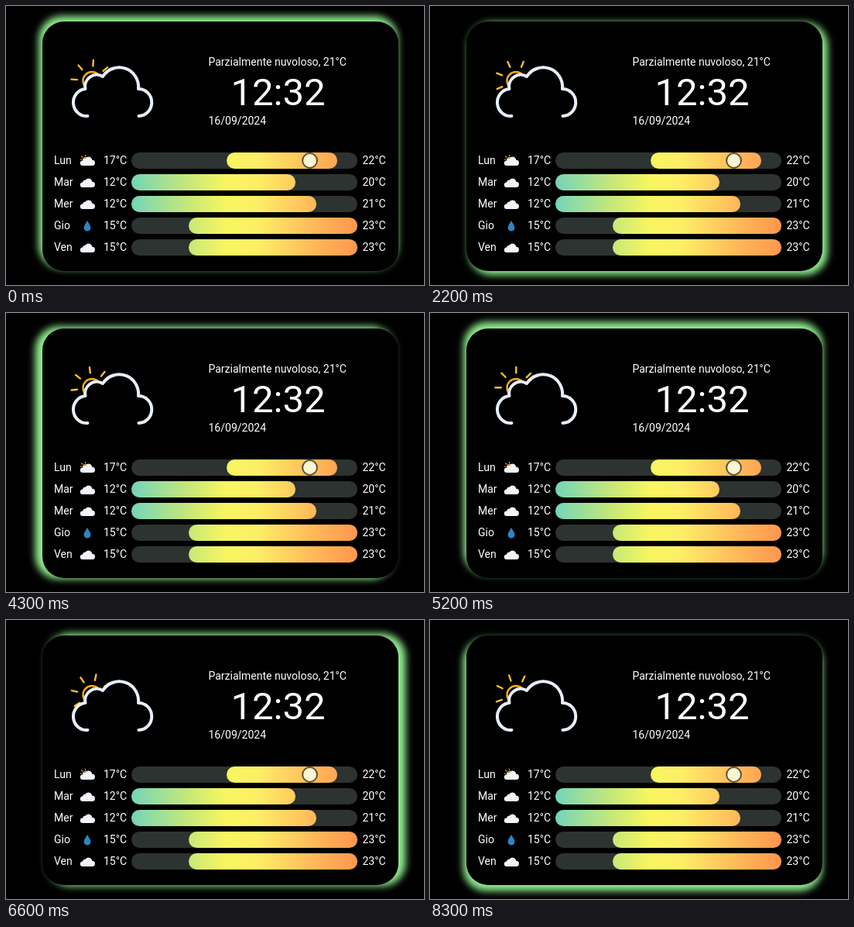
Write an HTML page that moves like this. It is 540 by 360 pixels and loops after 8.4 s.

```html
<!DOCTYPE html>
<html lang="it">
<head>
<meta charset="utf-8">
<title>Meteo</title>
<style>
  html, body { margin: 0; width: 100%; height: 100%; overflow: hidden; background: #000; }
  #stage { position: relative; width: 540px; height: 360px; overflow: hidden; background: #000; }
  #card { position: absolute; left: 47px; top: 20px; width: 460px; height: 322px; border-radius: 28px; background: #000; }
  svg { position: absolute; left: 0; top: 0; }
  text { font: 400 14px Roboto, sans-serif; fill: #fff; }
  text.clock { font-size: 49px; }
</style>
</head>
<body>
<div id="stage">
  <div id="card"></div>
  <svg width="540" height="360" viewBox="0 0 540 360">
    <defs>
      <linearGradient id="heat" gradientUnits="userSpaceOnUse" x1="162" y1="0" x2="454" y2="0">
        <stop offset="0" stop-color="#74d4b8"/>
        <stop offset=".11" stop-color="#98de9c"/>
        <stop offset=".25" stop-color="#c6e878"/>
        <stop offset=".42" stop-color="#f8f660"/>
        <stop offset=".56" stop-color="#fdee66"/>
        <stop offset=".7" stop-color="#fed060"/>
        <stop offset=".82" stop-color="#ffb658"/>
        <stop offset="1" stop-color="#ff964f"/>
      </linearGradient>
      <path id="cloud" d="M99.2 206a3.3 3.3 0 0 1-.2-6.6a3.9 3.9 0 0 1 3.8-3a4.7 4.7 0 0 1 8.4 2.4a3.6 3.6 0 0 1 .3 7.2z" fill="#f1f4fa"/>
      <path id="drop" d="M105 277c1.8 3.6 4.4 6.2 4.4 9.2a4.4 4.4 0 0 1-8.8 0c0-3 2.6-5.6 4.4-9.2z" fill="#2c86c4"/>
    </defs>

    <g stroke="#fbbf24" stroke-width="2.4" stroke-linecap="round" fill="none">
      <circle cx="111" cy="96.5" r="11.5" stroke="#f8af18"/>
      <g id="rays"></g>
    </g>
    <path d="M105.5 142A17 17.5 0 0 1 102.5 107A15 15 0 0 1 125 91A25 25 0 0 1 171 107A17 17.5 0 0 1 171.5 142"
      fill="#000" stroke="#e8effb" stroke-width="4" stroke-linecap="round" stroke-linejoin="round"/>

    <text x="261.5" y="77">Parzialmente nuvoloso, 21°C</text>
    <text class="clock" x="351.5" y="128" text-anchor="middle">12:32</text>
    <text x="261.5" y="153">16/09/2024</text>
    <path d="M97.5 194l1.4 1M102.5 192.2l.2 1.4M96.2 198h1.3M99.2 198a4 4 0 0 1 4.2-2.6" stroke="#f0b030" stroke-width="1.1" stroke-linecap="round" fill="none"/>
    <g id="days"></g>
    <circle cx="392.5" cy="199.5" r="9.4" fill="#fdf5d2" stroke="#57503a" stroke-width="2"/>
  </svg>
</div>
<script>
  const LOOP = 8400, STEP = 100;
  const card = document.getElementById('card');
  const rays = document.getElementById('rays');

  for (let a = 0; a < 360; a += 45)
    rays.innerHTML += `<path d="M111 77.3v-7.4" transform="rotate(${a} 111 96.5)"/>`;

  // day, low, high, bar start, bar end, icon
  const days = [
    ['Lun', 17, 22, 285, 428, 'cloud'],
    ['Mar', 12, 20, 162, 374, 'cloud'],
    ['Mer', 12, 21, 162, 401, 'cloud'],
    ['Gio', 15, 23, 236, 454, 'drop'],
    ['Ven', 15, 23, 236, 454, 'cloud']
  ];
  const bar = (x1, x2, y, fill) =>
    `<rect x="${x1}" y="${y}" width="${x2 - x1}" height="21" rx="10.5" fill="${fill}"/>`;

  document.getElementById('days').innerHTML = days.map(([day, low, high, from, to, icon], i) => {
    const y = 189 + 28 * i;
    return `<text x="62" y="${y + 15}">${day}</text>
      <use href="#${icon}" y="${icon === 'drop' ? 0 : 28 * i}"/>
      <text x="156" y="${y + 15}" text-anchor="end">${low}°C</text>
      ${bar(162, 454, y, '#2d3331')}${bar(from, to, y, 'url(#heat)')}
      <text x="460.5" y="${y + 15}">${high}°C</text>`;
  }).join('');

  // Triangle wave in -1..1 that peaks at every whole turn.
  const swing = turn => 4 * Math.abs(turn - Math.floor(turn) - 0.5) - 1;

  function draw(now) {
    const t = Math.floor((now % LOOP) / STEP) * STEP / 1000;
    // The glow passes right, bottom, left and top in straight moves.
    const turn = (t - 1.7) / 5;
    const dx = 8 * swing(turn), dy = 8 * swing(turn - 0.25);
    card.style.boxShadow = `${dx.toFixed(2)}px ${dy.toFixed(2)}px 10px 2px #90ee90`;
    rays.setAttribute('transform', `rotate(${4 + 8 * t} 111 96.5)`);
  }
  const start = performance.now();
  function tick() {
    draw(performance.now() - start);
    requestAnimationFrame(tick);
  }
  tick();
</script>
</body>
</html>
```
